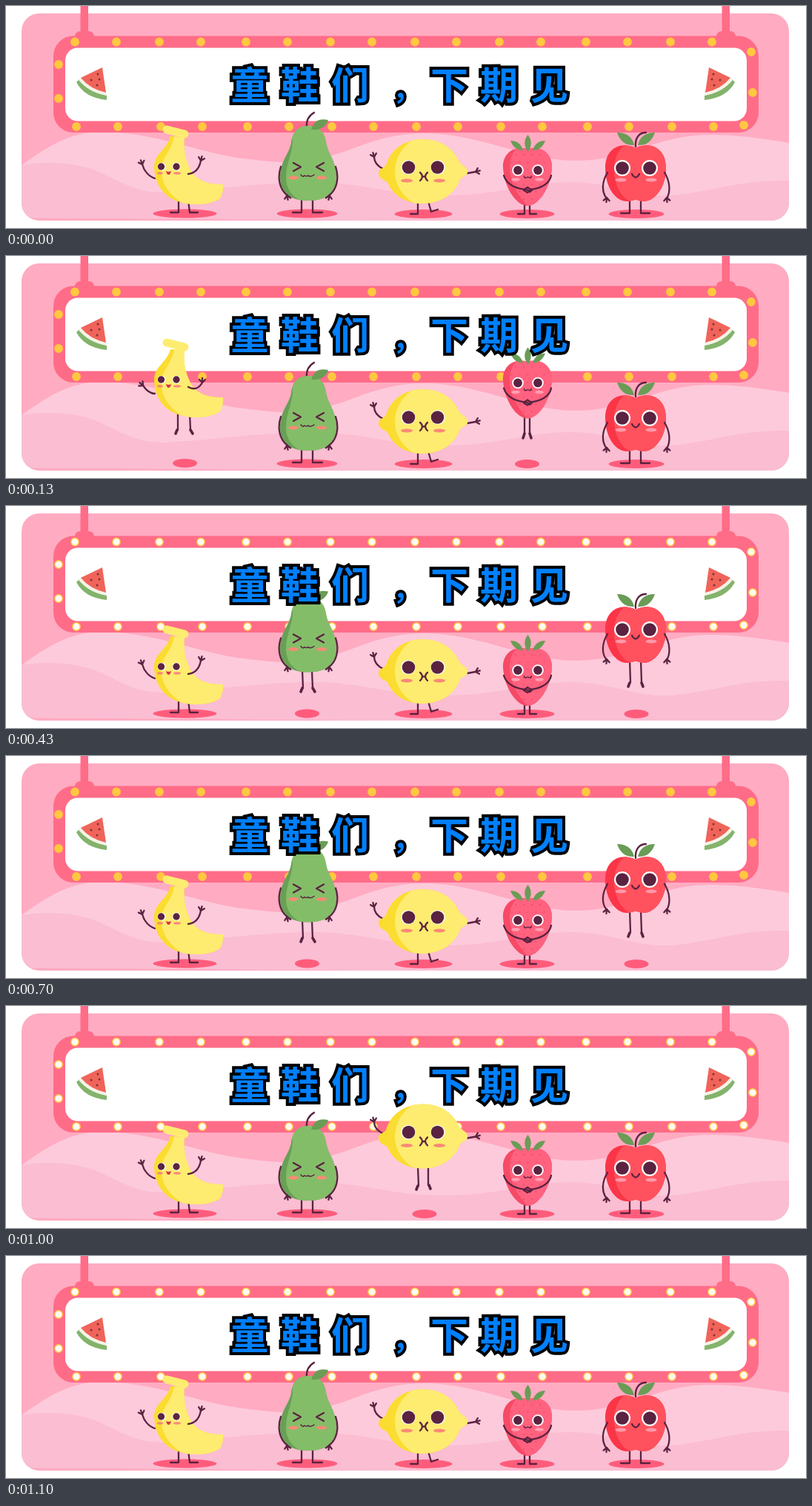
Write an HTML page that moves like this. It is 1080x300 px and loops after 1370 ms.

```html
<!DOCTYPE html>
<html lang="zh-CN">
<head>
<meta charset="utf-8">
<title>童鞋们，下期见</title>
<style>
@property --up { syntax: "<number>"; inherits: true; initial-value: 0; }
html, body { margin: 0; width: 100%; height: 100%; overflow: hidden; background: #fff; }
svg { display: block; width: 1080px; height: 300px; }

.first, .second, .third { animation: first 1370ms step-end infinite; }
.second { animation-name: second; }
.third { animation-name: third; }
@keyframes first { 0% { --up: 0 } 9.48% { --up: 1 } 31.38% { --up: 0 } 100% { --up: 0 } }
@keyframes second { 0% { --up: 0 } 31.38% { --up: 1 } 56.2% { --up: 0 } 100% { --up: 0 } }
@keyframes third { 0% { --up: 0 } 56.2% { --up: 1 } 80.29% { --up: 0 } 100% { --up: 0 } }
.body { transform: translateY(calc(var(--up) * var(--h))); }
.air { opacity: var(--up); }
.stand { opacity: calc(1 - var(--up)); }

.bulbs { fill: #ffc840; stroke: #ffc840; stroke-width: 1.4; animation: blink 1370ms step-end infinite; }
@keyframes blink {
  0% { fill: #ffc840 } 24.08% { fill: #fffaf0 } 51.09% { fill: #ffc840 }
  72.99% { fill: #fffaf0 } 100% { fill: #fffaf0 }
}

.line { fill: none; stroke: #5a2340; stroke-width: 2.3; stroke-linecap: round; stroke-linejoin: round; }
.thin { stroke-width: 1.5; }
.foot { stroke-width: 3.6; }
.shadow { fill: #ff5c7c; }
.leaf { fill: #6a9c56; }
.ink { fill: #5a2340; }
.white { fill: #fff; }
.blush { fill: #f98a76; }
.title {
  font: 700 51px "Noto Sans CJK SC", "Noto Sans CJK", sans-serif;
  fill: #0080ff; stroke: #000; stroke-width: 8; stroke-linejoin: miter; stroke-miterlimit: 2; paint-order: stroke;
}
.comma { font-size: 38px; }
</style>
</head>
<body>
<svg viewBox="0 0 1080 300">
  <defs>
    <clipPath id="card"><rect x="21" y="10" width="1036" height="280" rx="24"/></clipPath>
    <path id="banana" d="M222 176L241 177C239 192 242 206 247 217C254 235 270 242 293 241Q294 251 289 260C274 270 250 270 232 264C209 256 200 236 200 216C201 199 217 194 222 176Z"/>
    <path id="pear" d="M408 162C424 162 430 172 432 184C434 200 446 208 446 232C446 253 432 263 408 263C384 263 370 253 370 232C370 208 383 200 385 184C387 172 393 162 408 162Z"/>
    <path id="lemon" d="M513 215C520 192 540 180 563 180C588 180 605 194 612 211C616 216 623 218 623 223C624 229 617 230 613 234C606 254 587 267 562 267C540 267 522 256 515 238C510 235 503 232 503 226C503 219 510 220 513 215Z"/>
    <path id="berry" d="M704 193C726 188 738 202 737 219C735 246 719 270 704 270C689 270 673 246 671 219C670 202 682 188 704 193Z"/>
    <path id="apple" d="M850 192C871 182 891 193 891 219C891 246 875 264 861 264C855 264 854 262 850 262C846 262 844 264 838 264C823 264 809 245 809 219C809 193 829 182 850 192Z"/>
    <clipPath id="bananaClip"><use href="#banana"/></clipPath>
    <clipPath id="pearClip"><use href="#pear"/></clipPath>
    <clipPath id="lemonClip"><use href="#lemon"/></clipPath>
    <clipPath id="berryClip"><use href="#berry"/></clipPath>
    <clipPath id="appleClip"><use href="#apple"/></clipPath>
    <path id="hand" d="M0 0L-4 -4M0 0L0 -6M0 0L4 -4"/>
    <g id="eye"><circle r="11" class="white"/><circle r="8.8" class="ink"/></g>
    <g id="slice">
      <path d="M95 103Q106 124 136 127L136 121Q112 116 99 99Z" fill="#84b36c"/>
      <path d="M98 100Q112 117 136 121L135 116L102 96Z" fill="#f5f3e6"/>
      <path d="M130 83L101 97Q113 112 135 117Z" fill="#f0645a"/>
      <g fill="#7b3439"><circle cx="124" cy="92" r="1.5"/><circle cx="115" cy="100" r="1.5"/><circle cx="126" cy="99" r="1.5"/><circle cx="123" cy="107" r="1.5"/></g>
    </g>
    <g id="hanger" fill="#ff6c88"><rect x="100.500" width="10.500" height="44"/><path d="M93 45V42Q93 34 101 34H111Q119 34 119 42V45Z"/></g>
  </defs>

  <g clip-path="url(#card)">
    <rect x="21" y="10" width="1036" height="280" fill="#ffabc2"/>
    <path fill="#fdcadb" d="M21 215C55 191 85 170 130 170C205 171 260 199 320 206C345 209 360 211 380 211C460 210 485 172 565 172C640 172 700 209 770 209C840 209 880 174 950 174C990 174 1025 180 1057 185V290H540L21 286Z"/>
    <path fill="#fabdd2" d="M21 215C55 210 90 211 120 222C155 237 175 253 215 252C280 249 340 238 420 238C490 240 520 256 590 256C670 256 700 238 765 238C820 239 850 259 900 256C960 250 990 235 1057 236V290H540L21 286Z"/>
  </g>

  <use href="#hanger"/><use href="#hanger" x="866"/>
  <rect x="64" y="40.500" width="952" height="130.500" rx="27" fill="#ff6c88"/>
  <rect x="80" y="56.500" width="920" height="99" rx="17" fill="#fff"/>
  <g class="bulbs" id="bulbs"></g>
  <use href="#slice"/><use href="#slice" transform="matrix(-1 0 0 1 1079 0)"/>

  <!-- banana -->
  <g class="first" style="--h:-50px">
    <g class="stand">
      <ellipse class="shadow" cx="241.500" cy="280.500" rx="43" ry="6"/>
      <path class="line" d="M233 262V279H222M246 262L248 279H259"/>
    </g>
    <g class="air">
      <ellipse class="shadow" cx="241.500" cy="280" rx="16.500" ry="6"/>
      <path class="line" d="M232 213V235M248 213L249 235"/>
      <path class="line foot" d="M231 235L229 240M249 235L252 240"/>
    </g>
    <g class="body">
      <use href="#banana" fill="#fbdc30"/>
      <path clip-path="url(#bananaClip)" fill="#fdec70" d="M226 170H300V275H258C224 264 205 239 211 214C214 200 226 193 228 170Z"/>
      <path d="M217 167L241 173" stroke="#fdec70" stroke-width="11" stroke-linecap="round"/>
      <g class="line stand">
        <path d="M201 233C192 230 186 222 184 214M246 227C255 226 261 220 263 209"/>
        <use href="#hand" transform="translate(184 214) rotate(-20)"/><use href="#hand" transform="translate(263 209) rotate(15)"/>
      </g>
      <g class="line air">
        <path d="M201 236C194 236 189 231 185 225M246 227C253 231 260 230 265 221"/>
        <use href="#hand" transform="translate(185 225) rotate(-50)"/><use href="#hand" transform="translate(265 221)"/>
      </g>
      <g class="white"><circle cx="210" cy="217" r="5.600"/><circle cx="230" cy="217" r="5.600"/></g>
      <g class="ink"><circle cx="209.500" cy="217" r="4.700"/><circle cx="230" cy="217" r="4.700"/></g>
      <g class="blush"><ellipse cx="208" cy="226" rx="4" ry="1.700"/><ellipse cx="231" cy="226" rx="5" ry="1.700"/></g>
      <path d="M216 223Q219.500 225 223 223Q222 228 219.500 228Q217 228 216 223Z" fill="#d83449"/>
    </g>
  </g>

  <!-- pear -->
  <g class="second" style="--h:-38.5px">
    <g class="stand">
      <ellipse class="shadow" cx="406.500" cy="280.500" rx="41" ry="6"/>
      <path class="line" d="M399 260V279H387M414 260V279H427"/>
    </g>
    <g class="air">
      <ellipse class="shadow" cx="406.500" cy="280.500" rx="16.500" ry="6"/>
      <path class="line" d="M400 222L401 246M413 222L414 246"/>
      <path class="line foot" d="M400 246L398 251M414 246L417 251"/>
    </g>
    <g class="body">
      <path class="line" d="M406 164C405 154 409 148 416 144"/>
      <use href="#pear" fill="#68a055"/>
      <path clip-path="url(#pearClip)" fill="#84bd68" d="M385 160H450V266H408C388 262 378 248 378 232C378 212 386 202 387 184Z"/>
      <path class="leaf" d="M412 167C416 153 425 152 435 154C432 164 424 168 412 167Z"/>
      <g class="line">
        <path d="M371 217C366 232 369 248 380 256M445 217C450 232 447 248 436 256"/>
        <use href="#hand" transform="translate(379.500 256) rotate(170)"/><use href="#hand" transform="translate(436.500 256) rotate(-170)"/>
        <path d="M388 212L398 217.500L388 223M429 212L419 217.500L429 223"/>
        <path class="thin" d="M398 228Q401 232 403 229Q406 231 408 229Q411 232 416 228"/>
      </g>
      <g class="blush"><ellipse cx="388" cy="232" rx="7" ry="2.500"/><ellipse cx="426" cy="232" rx="7" ry="2.500"/></g>
    </g>
  </g>

  <!-- lemon -->
  <g class="third" style="--h:-47.500px">
    <g class="stand">
      <ellipse class="shadow" cx="563.500" cy="281" rx="39" ry="6"/>
      <path class="line" d="M556 264V281H546M570 264L574 278L583 275"/>
    </g>
    <g class="air">
      <ellipse class="shadow" cx="565" cy="281" rx="16.500" ry="6"/>
      <path class="line" d="M556 217L557 243M570 217V242"/>
      <path class="line foot" d="M556 243L554 248M571 242L573 247"/>
    </g>
    <g class="body">
      <g class="line">
        <path d="M509 220C501 216 497 211 497 204M623 226L634 224"/>
        <use href="#hand" transform="translate(497 204) rotate(-15)"/><use href="#hand" transform="translate(634 224) rotate(75)"/>
      </g>
      <use href="#lemon" fill="#fbdc30"/>
      <path clip-path="url(#lemonClip)" fill="#fdec70" d="M553 178H630V270H557C537 260 525 244 525 223C525 204 537 188 553 178Z"/>
      <g class="white"><circle cx="543" cy="218" r="9.800"/><circle cx="583" cy="218" r="9.800"/></g>
      <g class="ink"><circle cx="543.500" cy="218" r="8.800"/><circle cx="582.500" cy="218" r="8.800"/></g>
      <g class="blush"><ellipse cx="541" cy="236" rx="8" ry="2.600"/><ellipse cx="585" cy="236" rx="8" ry="2.600"/></g>
      <path class="line" d="M559 225Q565 230 559 236M569 225Q563 230 569 236M562 230.500H566"/>
    </g>
  </g>

  <!-- strawberry -->
  <g class="first" style="--h:-50.500px">
    <g class="stand">
      <ellipse class="shadow" cx="703.500" cy="281" rx="37" ry="6"/>
      <path class="line" d="M700 267V281H691M707 267V281H716"/>
    </g>
    <g class="air">
      <ellipse class="shadow" cx="703.500" cy="281" rx="16.500" ry="6"/>
      <path class="line" d="M700 217V240M707 217V240"/>
      <path class="line foot" d="M700 240L698 246M707 240L709 246"/>
    </g>
    <g class="body">
      <use href="#berry" fill="#f64a67"/>
      <path clip-path="url(#berryClip)" fill="#ff627f" d="M694 188H740V272H706C688 254 680 235 680 218Q680 199 694 188Z"/>
      <g id="seeds" fill="#ed4b6b"></g>
      <path class="leaf" d="M704.500 174Q713 185 704.500 197Q696 185 704.500 174ZM681 182Q694 182 698 195Q686 195 681 182ZM728 182Q715 182 711 195Q723 195 728 182Z"/>
      <g class="white"><circle cx="691" cy="222" r="7.800"/><circle cx="718" cy="222" r="7.800"/></g>
      <g class="ink"><circle cx="691" cy="222" r="5.900"/><circle cx="718" cy="222" r="5.900"/></g>
      <g fill="#ffa0b2"><ellipse cx="688" cy="234.500" rx="6" ry="2.200"/><ellipse cx="720" cy="234.500" rx="6" ry="2.200"/></g>
      <g class="line">
        <path class="thin" d="M699.500 230Q700 234 704.500 231Q709 234 709 230"/>
        <path d="M672 229C675 240 687 247 702 248M736 229C734 240 722 247 707 248"/>
        <path d="M699 249L704 245L710 249L704 252ZM701 247L708 251"/>
      </g>
    </g>
  </g>

  <!-- apple -->
  <g class="second" style="--h:-52px">
    <g class="stand">
      <ellipse class="shadow" cx="851" cy="281" rx="37.500" ry="6"/>
      <path class="line" d="M842 260V280H830M857 260V280H869"/>
    </g>
    <g class="air">
      <ellipse class="shadow" cx="851" cy="281" rx="16.500" ry="6"/>
      <path class="line" d="M842 208L843 238M857 208L858 238"/>
      <path class="line foot" d="M842 239L840 244M858 239L860 244"/>
    </g>
    <g class="body">
      <use href="#apple" fill="#fb3548"/>
      <path clip-path="url(#appleClip)" fill="#ff525e" d="M838 186H895V266H846C829 259 821 240 821 221Q821 198 838 186Z"/>
      <path class="leaf" d="M825 171Q844 171 848 188Q831 189 825 171ZM876 171Q857 171 853 188Q870 189 876 171Z"/>
      <g class="line">
        <path d="M850 190C849 178 855 171 864 171M812 225C804 238 804 252 811 260M889 225C897 238 897 252 892 260"/>
        <use href="#hand" transform="translate(811 259) rotate(185)"/><use href="#hand" transform="translate(892 259) rotate(175)"/>
        <path d="M845 227Q850 236 855 227"/>
      </g>
      <use href="#eye" x="832" y="219"/><use href="#eye" x="869" y="219"/>
      <g fill="#ff98a8"><ellipse cx="830" cy="235" rx="7.500" ry="2.600"/><ellipse cx="871" cy="235" rx="7.500" ry="2.600"/></g>
    </g>
  </g>

  <text class="title" x="303.500 371 439 522 573 640 708" y="125.500">童鞋们<tspan class="comma">，</tspan>下期见</text>
</svg>
<script>
const dot = (parent, cx, cy, r) => {
  const c = document.createElementNS(parent.namespaceURI, "circle");
  Object.entries({ cx, cy, r }).forEach(([k, v]) => c.setAttribute(k, v));
  parent.append(c);
};
const bulbs = document.getElementById("bulbs");
const steps = [0, 56, 114, 170, 231, 287, 345, 401];
for (let i = 0; i < 16; i++) {
  const x = 93 + 459 * (i >> 3) + steps[i % 8];
  dot(bulbs, x, 48.5, 5.2);
  dot(bulbs, x + 2, 163, 5.2);
}
[[71, 79], [71, 125], [1006, 62], [1008, 117], [996, 161]].forEach(([x, y]) => dot(bulbs, x, y, 5.2));

const seeds = document.getElementById("seeds");
for (let row = 0; row < 7; row++) {
  const n = [4, 5, 5, 4, 4, 3, 2][row];
  for (let i = 0; i < n; i++) dot(seeds, 704.5 + (i - (n - 1) / 2) * 11, 201 + row * 10, 1);
}
</script>
</body>
</html>
```
